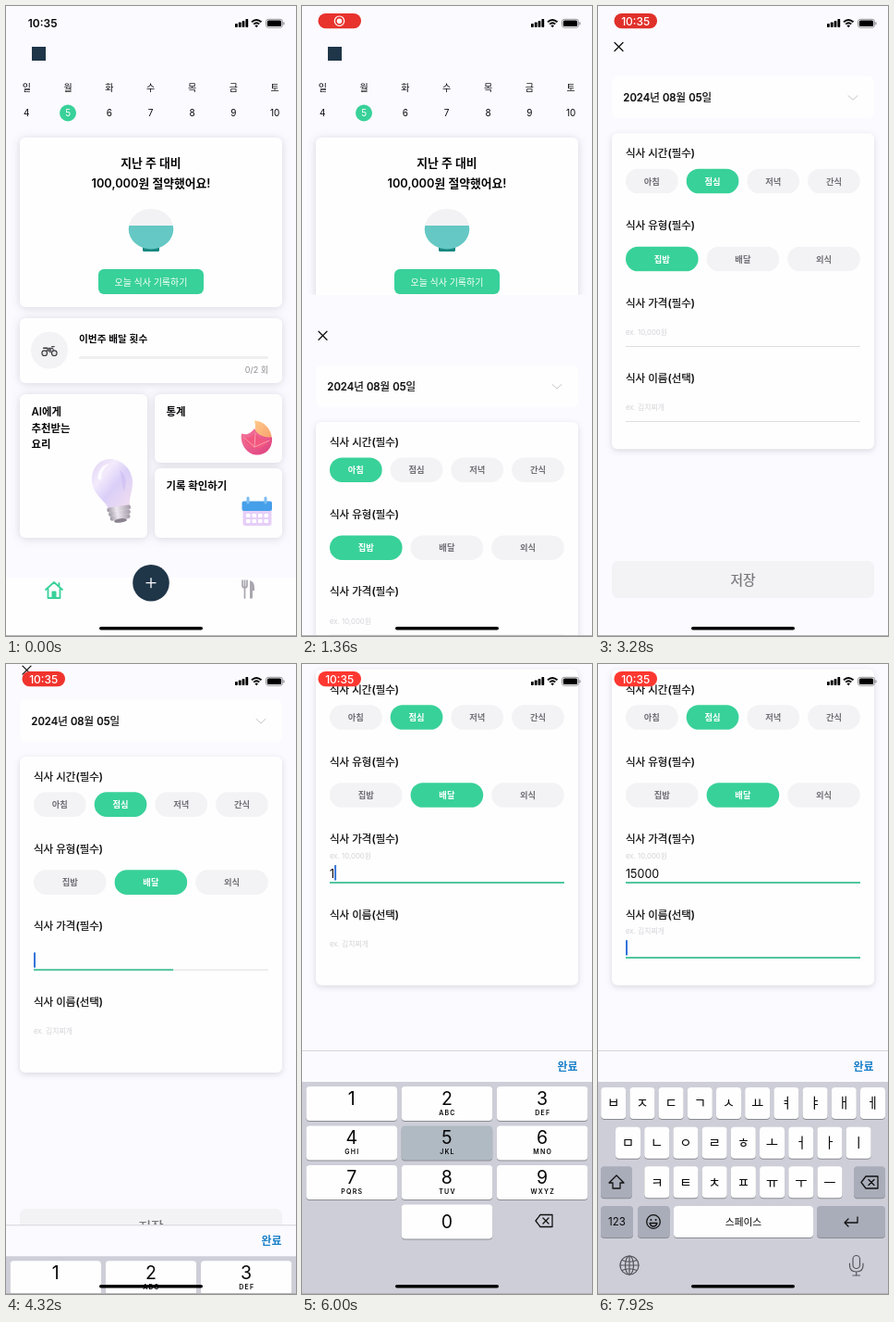
Write an HTML page that moves like this. It is 314 px wide and 680 px high and loops after 8000 ms.

```html
<!DOCTYPE html>
<html lang="ko">
<head>
<meta charset="utf-8">
<style>
html, body { margin: 0; width: 100%; height: 100%; overflow: hidden; background: #fbfaff; }
svg { display: block; width: 314px; height: 680px; }
text { font-family: Inter, 'Noto Sans CJK KR', 'Noto Sans CJK SC', 'Noto Sans CJK', sans-serif; fill: #08080a; white-space: pre; }
.mid { text-anchor: middle; }
.end { text-anchor: end; }
.m { font-weight: 500; stroke: #08080a; stroke-width: .22; }
.b { font-weight: 600; }
.w { fill: #fff; stroke: none; }
.grey { fill: #8f8f95; }
.hint { fill: #d3d3d8; }
.card { filter: drop-shadow(0 1px 5px rgba(50, 42, 66, .17)); }
#form .card { filter: drop-shadow(0 2px 3px rgba(50, 42, 66, .16)); }
.key { filter: drop-shadow(0 1px 0 #8b8c92); }
.chip rect { fill: #f3f2f5; }
.chip text { fill: #707076; }
.chip.on rect { fill: #38d199; }
.chip.on text { fill: #fff; }
.line { fill: none; stroke: #111; stroke-width: 1.3; stroke-linecap: round; stroke-linejoin: round; }
</style>
</head>
<body>
<svg id="stage" viewBox="0 0 314 680"></svg>
<script>
const GREEN = '#38d199', NAVY = '#1f3548', BG = '#fbfaff', PALE = '#f3f2f5';
const LOOP = 8000, MODAL = 1240, LUNCH = 2400, DELIVERY = 3720, PRICE = 4259, NAME = 7400;
// [key, press time, release time]
const PRESSES = [['1', 5480, 5600], ['5', 5920, 6060], ['0', 6280, 6380], ['0', 6540, 6640], ['0', 6800, 6900]];

const T = (x, y, s, size, cls = '', more = '') =>
  `<text x="${x}" y="${y}" font-size="${size}" class="${cls}" ${more}>${s}</text>`;
const R = (x, y, w, h, r, fill, more = '') =>
  `<rect x="${x}" y="${y}" width="${w}" height="${h}" rx="${r}" fill="${fill}" ${more}/>`;
const C = (x, y, r, fill, more = '') => `<circle cx="${x}" cy="${y}" r="${r}" fill="${fill}" ${more}/>`;
const P = (d, fill, more = '') => `<path d="${d}" fill="${fill}" ${more}/>`;
const L = (d, more = '') => `<path d="${d}" class="line" ${more}/>`;
const G = (id, s) => `<g id="${id}">${s}</g>`;
const card = (x, y, w, h) => R(x, y, w, h, 6, '#fefefe', 'class="card"');
const each = (list, f) => [...list].map(f).join('');

const defs = `<defs>
  <linearGradient id="glass" x1="0" y1="0" x2="1" y2="1">
    <stop offset="0" stop-color="#dfd0f3"/><stop offset=".3" stop-color="#f3ebfc"/>
    <stop offset=".55" stop-color="#dacff8"/><stop offset="1" stop-color="#f3dfee"/></linearGradient>
  <linearGradient id="metal"><stop offset="0" stop-color="#9a93a0"/>
    <stop offset=".4" stop-color="#ece7ee"/><stop offset="1" stop-color="#a49ba8"/></linearGradient>
  <linearGradient id="peach" x1="0" y1="0" x2="1" y2="1">
    <stop offset="0" stop-color="#ffd08f"/><stop offset="1" stop-color="#f79a68"/></linearGradient>
  <linearGradient id="rose" x1="0" y1="0" x2="1" y2="1">
    <stop offset="0" stop-color="#f5779b"/><stop offset="1" stop-color="#de3f7e"/></linearGradient>
  <clipPath id="bowl"><ellipse cx="157" cy="240.7" rx="24.3" ry="21.8"/></clipPath>
</defs>`;

const bike = `<g transform="translate(47 372) scale(.88) translate(-47 -371)">`
  + L('M42 373L46 368H51L53 373M44 368L48 373H51M50 366L53 366', 'style="stroke:#4a4a50"')
  + each([41, 53], x => C(x, 374, 3.2, '#e2e2e5', 'stroke="#3a3a3f" stroke-width="1.3"'))
  + R(44.5, 368.5, 5, 3.5, 1, '#66666c') + R(39, 367, 6, 1.8, .9, '#333338') + '</g>';

const bulb = P('M111 489C124 488 137 499 137 514C137 524 133 531 134 539L111 543C109 535 94 528 93 513C92 500 100 490 111 489Z', 'url(#glass)')
  + P('M99 510C100 500 105 495 112 494C106 499 103 504 103 512Z', '#fff', 'opacity=".8"')
  + P('M123 501C131 506 131 517 127 524C126 516 125 508 123 501Z', '#c3b2f2', 'opacity=".4"')
  + `<g transform="rotate(-8 123 548)">${each([0, 1, 2], i => R(110 + i, 540 + i * 4.8, 26 - i * 2, 5, 2.4, 'url(#metal)'))}
    <ellipse cx="123" cy="555.5" rx="7" ry="2.2" fill="#8a828f"/></g>`;

const fruit = P('M269 447.5C281 448 289 459 288 471L265 467C270 461 271 455 269 447.5Z', 'url(#peach)')
  + P('M255 461.5C262 464 266 460 269 456C272 463 279 466 288 465.5C289 478 281 485 271 484.5C260 483.5 253 472 255 461.5Z', 'url(#rose)')
  + P('M258 466C263 467 267 465 270 461C273 467 278 469 285 469C281 476 273 479 267 477C262 475 259 471 258 466Z', '#f2587f')
  + L('M258 466L269 476L285 469M269 476L270 461', 'style="stroke:#f9a5b8;stroke-width:.9"');

const calendar = R(256.5, 537, 31, 24, 2.5, '#e6cff8') + R(255.5, 534.5, 32.5, 10.5, 2, '#469fe9')
  + each([262, 281], x => R(x - 1.5, 529.5, 3, 8, 1.5, '#7abdf2'))
  + each([0, 1, 2, 3, 4, 5, 6, 7], i => R(260 + i % 4 * 6.5, 548 + (i >> 2) * 6, 4.5, 4, 1, '#fff'));

const home = each('일월화수목금토', (d, i) => {
    const x = 22.3 + i * 44.8;
    return T(x, 91.5, d, 10, 'mid') + (i == 1 ? C(67, 115.5, 9, GREEN) : '')
      + T(x, 118.5, i + 4, 10, 'mid' + (i == 1 ? ' w' : ''));
  })
  + R(28, 44, 15, 15, 0, NAVY)
  + card(15, 142, 284, 183)
  + T(157, 173.8, '지난 주 대비', 12.8, 'mid b') + T(157, 196.3, '100,000원 절약했어요!', 12.8, 'mid b')
  + R(148, 259, 18, 6, 1.5, '#16877f')
  + `<g clip-path="url(#bowl)">${R(132, 218, 50, 19, 0, '#f2f2f4') + R(132, 237, 50, 26, 0, '#65c8c4')}</g>`
  + R(100, 284, 114, 27, 6, GREEN) + T(157, 301.6, '오늘 식사 기록하기', 10, 'mid m w')
  + card(15, 337, 284, 70) + C(47, 371.5, 20, PALE) + bike
  + T(79, 363, '이번주 배달 횟수', 10.7, 'b') + R(79, 378, 205, 3, 1.5, '#efeff1')
  + T(284, 395.5, '0/2 회', 9, 'end grey')
  + card(15, 419, 138, 155) + each(['AI에게', '추천받는', '요리'], (s, i) => T(27.5, 442.3 + i * 17.4, s, 11.4, 'b')) + bulb
  + card(161, 419, 138, 74) + T(173.5, 442, '통계', 11.4, 'b') + fruit
  + card(161, 499, 138, 75) + T(173.5, 522, '기록 확인하기', 11.4, 'b') + calendar
  + R(0, 617, 314, 63, 0, '#fefefe')
  + L('M43 630L52 622L61 630M45.5 629V639H58.5V629M57.5 623V626', `style="stroke:${GREEN};stroke-width:1.8"`)
  + R(49.5, 631.5, 5, 7.5, 1, GREEN)
  + C(157, 622.7, 19.8, NAVY) + L('M152 622.7H162M157 617.7V627.7', 'style="stroke:#fff"')
  + L('M256 620V625Q256 628 258.5 628Q261 628 261 625V620M258.5 620V639', 'style="stroke:#a9a6ae;stroke-width:1.7"')
  + P('M264 639V620Q269 621 269 628V631H267V639Q265.5 640.5 264 639Z', '#a9a6ae');

const chips = (group, y, w, step, names) => each(names, (s, i) => {
  const x = 30 + i * step;
  return `<g class="chip ${group}">${R(x, y, w, 26.6, 13.3, PALE)}${T(x + w / 2, y + 16.8, s, 9.3, 'mid b')}</g>`;
});

const field = (id, y, hint) => R(30, y, 254, 1, 0, '#dedee2', `id="${id}Rule"`)
  + R(30, y - .5, 0, 2, 0, '#52c5a0', `id="${id}Bar"`)
  + T(30, y - 11.8, hint, 7.8, 'hint', `id="${id}Hint"`)
  + T(30, y - 5, '', 12.5, '', `id="${id}Text"`)
  + R(30, y - 18.5, 2, 16.5, .5, '#3474da', `id="${id}Caret"`);

const form = R(0, 0, 314, 680, 0, BG)
  + G('save', R(15, 599, 284, 40, 7, PALE) + T(157, 624.5, '저장', 14.7, 'mid', 'style="fill:#77777c;font-weight:500;stroke:#77777c;stroke-width:.22"'))
  + G('page', L('M18 39.5L27 48.5M27 39.5L18 48.5')
    + R(15, 76, 284, 45, 6, '#fefefe') + T(27.3, 103, '2024년 08월 05일', 11.5, 'm')
    + L('M271 96.8L276 101.3L281 96.8', 'style="stroke:#c6c6cc;stroke-width:1"')
    + card(15, 137.3, 284, 341)
    + each([['시간(필수)', 163.3], ['유형(필수)', 241.3], ['가격(필수)', 324.6], ['이름(선택)', 406.2]], ([s, y]) => T(30, y, '식사 ' + s, 11.5, 'm'))
    + chips('time', 175.7, 56.7, 65.7, ['아침', '점심', '저녁', '간식'])
    + chips('kind', 259.7, 78.6, 87.6, ['집밥', '배달', '외식'])
    + field('price', 367, 'ex. 10,000원') + field('name', 448, 'ex. 김치찌개'));

const key = (x, y, w, h, fill = '#fefefe', more = '') => R(x, y, w, h, 4, fill, `class="key" ${more}`);
const erase = (x, y) => L(`M${x - 9} ${y}L${x - 4} ${y - 6.5}H${x + 9}V${y + 6.5}H${x - 4}ZM${x - 1} ${y - 3}L${x + 5} ${y + 3}M${x + 5} ${y - 3}L${x - 1} ${y + 3}`);

const letters = ['', 'ABC', 'DEF', 'GHI', 'JKL', 'MNO', 'PQRS', 'TUV', 'WXYZ'];
const digits = each('1234567890', (d, i) => {
  const x = 4.5 + (d == 0 ? 1 : i % 3) * 103.2, y = 456 + Math.floor(i / 3) * 42.5;
  return key(x, y, 98.5, 37, '#fefefe', `id="key${d}"`) + T(x + 49.2, y + (d == 0 ? 25 : 19.5), d, 19.5, 'mid')
    + T(x + 49.8, y + 30.8, letters[i] || '', 7, 'mid b', 'letter-spacing="1.2"');
}) + erase(262, 601);

const DARK = '#a9adb9';
const hangul = each([['ㅂㅈㄷㄱㅅㅛㅕㅑㅐㅔ', 16.7, 457], ['ㅁㄴㅇㄹㅎㅗㅓㅏㅣ', 32.5, 499.7], ['ㅋㅌㅊㅍㅠㅜㅡ', 63.8, 542.3]],
  ([row, x0, y]) => each(row, (s, i) => {
    const x = x0 + i * 31.2;
    return key(x - 13.5, y, 27, 34) + T(x, y + 22.3, s, 14.5, 'mid');
  }))
  + key(3, 542.3, 34, 34, DARK) + L('M20 552L28 560H24V566H16V560H12Z')
  + key(277, 542.3, 34, 34, DARK) + erase(294, 559.5)
  + key(3, 585, 35, 34, DARK) + T(20.5, 606, '123', 11.5, 'mid')
  + key(43, 585, 34.5, 34, DARK) + C(60, 602, 7.3, 'none', 'stroke="#111" stroke-width="1.3"')
  + C(57.4, 600, 1, '#111') + C(62.6, 600, 1, '#111') + L('M56 603.5H64Q63 607 60 607Q57 607 56 603.5Z')
  + key(82, 585, 151, 34) + T(157.5, 605.5, '스페이스', 10.7, 'mid')
  + key(237, 585, 74, 34, DARK) + L('M281 597V603H267M271 599L267 603L271 607')
  + `<g fill="none" stroke="#55565c" stroke-width="1.2" stroke-linecap="round">
    <circle cx="34" cy="649" r="10"/><ellipse cx="34" cy="649" rx="4.5" ry="10"/>
    <path d="M24 649H44M34 639V659M26 643.5Q34 647 42 643.5M26 654.5Q34 651 42 654.5"/>
    <rect x="276" y="638.5" width="7.5" height="14" rx="3.7"/>
    <path d="M272.5 647V649Q272.5 656 279.7 656Q287 656 287 649V647M279.7 656V660M276 660H283.5"/></g>`;

const keyboard = R(0, 417, 314, 35, 0, BG) + R(0, 417, 314, 1, 0, '#d5d5da')
  + T(298.5, 438.7, '완료', 12, 'end b', 'style="fill:#1b80c8"')
  + R(0, 451, 314, 229, 0, '#cdced8') + G('digits', digits) + G('hangul', hangul);

const status = each([4, 5.5, 7, 9], (h, i) => R(248 + i * 3.8, 23 - h, 2.8, h, .8, '#000'))
  + L('M266 17.2Q271 12.6 276.5 17.2M268.2 19.6Q271.2 17 274.3 19.6', 'style="stroke:#000;stroke-width:1.9;stroke-linecap:butt"')
  + P('M269.4 21.2Q271.2 19.6 273 21.2L271.2 23.2Z', '#000')
  + R(281.5, 14.3, 18, 9, 2.6, 'none', 'stroke="#8c8c90" stroke-width=".9"') + R(282.8, 15.6, 15.4, 6.4, 1.5, '#000')
  + R(300.3, 17.2, 1.2, 3.2, .6, '#8c8c90')
  + T(39.6, 23, '10:35', 12, 'mid b', 'id="clock"')
  + G('pill', R(17.5, 8, 46.5, 16.3, 8.1, '#ff3b30', 'id="pillBack"')
    + G('record', C(40.5, 16.2, 5.2, 'none', 'stroke="#fff" stroke-width="1.2"') + C(40.5, 16.2, 2.8, '#fff'))
    + T(40.7, 20.5, '10:35', 12, 'mid m w', 'id="pillTime"'))
  + R(101, 670, 112, 3.6, 1.8, '#000') + R(0, 679, 314, 1, 0, '#b4b4b8');

const stage = document.getElementById('stage');
stage.innerHTML = defs + G('home', home) + G('form', form) + G('keyboard', keyboard) + status;

const $ = id => document.getElementById(id);
const show = (id, on) => $(id).style.display = on ? '' : 'none';
const shift = (id, y) => $(id).setAttribute('transform', `translate(0 ${y})`);
const clamp = v => Math.max(0, Math.min(1, v));
const spring = (ms, rate) => {
  const u = Math.max(0, ms) * rate;
  return 1 - (1 + u) * Math.exp(-u);
};
const select = (group, n) => document.querySelectorAll('.' + group).forEach((c, i) => c.classList.toggle('on', i == n));

function drawField(id, t, focus, y, value, lastEdit, active) {
  const on = t >= focus, float = clamp((t - focus - 60) / 180);
  $(id + 'Bar').setAttribute('width', 254 * clamp((t - focus + 29) / 153));
  const hint = $(id + 'Hint');
  hint.setAttribute('y', on ? y - 20 - 5.2 * float : y - 11.8);
  hint.style.opacity = on ? float : 1;
  const text = $(id + 'Text'), caret = $(id + 'Caret');
  if (text.textContent != value) text.textContent = value;
  caret.setAttribute('x', 30 + (value ? text.getComputedTextLength() : 0));
  caret.style.opacity = active && (t - lastEdit) % 1000 < 600 ? 1 : 0;
}

function draw(t) {
  shift('form', 680 * (1 - spring(t - MODAL, .015)));
  show('form', t >= MODAL);
  select('time', t < LUNCH ? 0 : 1);
  select('kind', t < DELIVERY ? 0 : 1);

  const rise = spring(t - PRICE, .017);
  shift('page', -131.5 * rise);
  shift('save', -39 * rise);
  show('keyboard', t >= PRICE);
  shift('keyboard', 263 * (1 - rise));
  show('digits', t < NAME);
  show('hangul', t >= NAME);

  const typed = PRESSES.filter(p => t >= p[2]);
  const edit = typed.length ? typed[typed.length - 1][2] : PRICE;
  drawField('price', t, PRICE, 367, typed.map(p => p[0]).join(''), edit, t >= PRICE && t < NAME);
  drawField('name', t, NAME, 448, '', NAME, t >= NAME);
  show('nameRule', t < PRICE);
  for (const d of '150') {
    const down = PRESSES.some(p => p[0] == d && t >= p[1] && t < p[2]);
    $('key' + d).setAttribute('fill', down ? '#b0bac3' : '#fefefe');
  }

  show('clock', t < 80);
  show('pill', t >= 80);
  show('record', t < 3000);
  show('pillTime', t >= 3000);
  const glow = .5 + .5 * Math.cos((t - 1880) / 2040 * 2 * Math.PI);
  $('pillBack').setAttribute('fill', `rgb(${210 + 45 * glow},${44 + 12 * glow},${40 + 8 * glow})`);
}

function tick() {
  draw(performance.now() % LOOP);
  requestAnimationFrame(tick);
}
tick();
</script>
</body>
</html>
```
